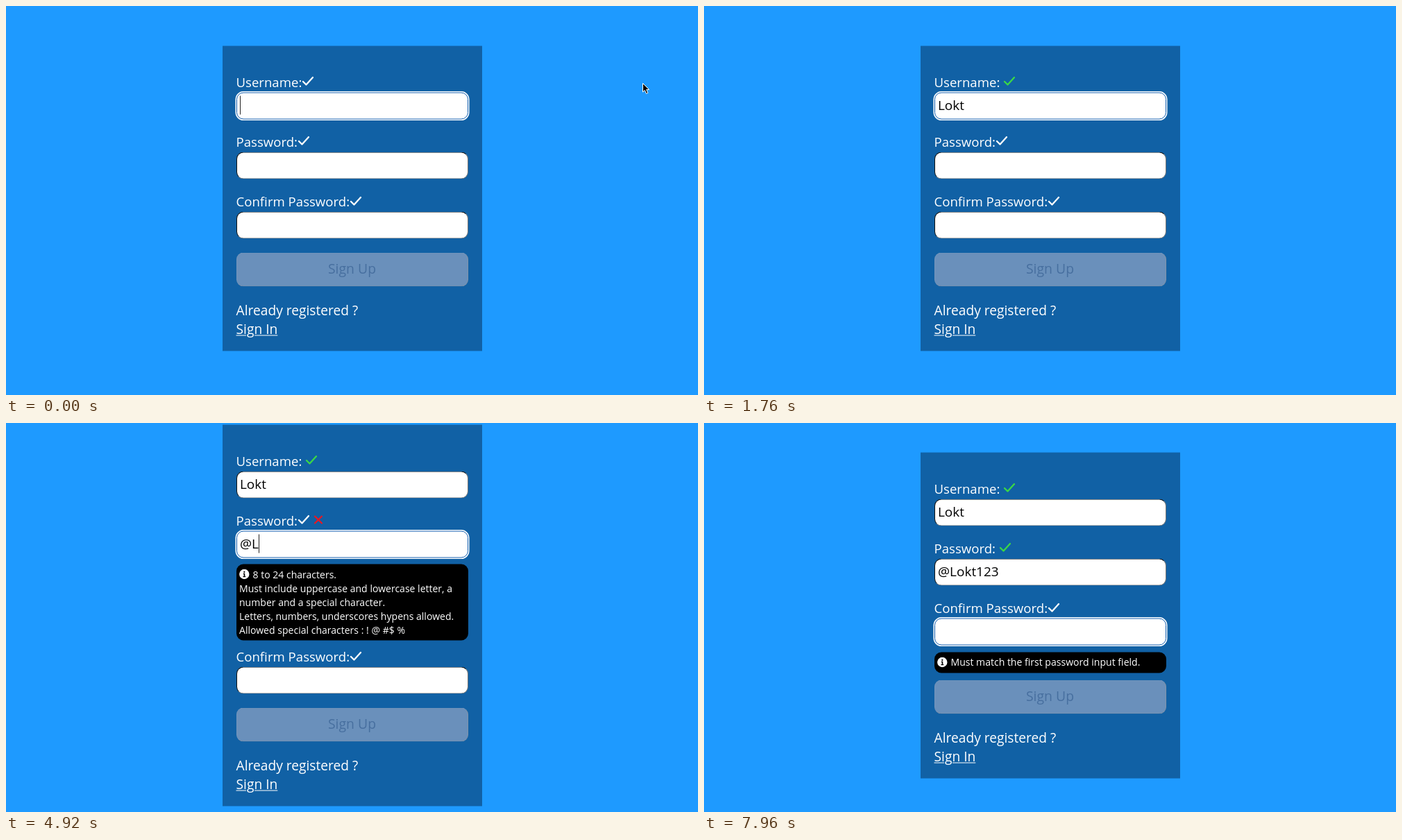
These frames come from a looping animation (997x561 px, 8000 ms). An HTML page:

```html
<!DOCTYPE html>
<html lang="en">
<head>
<meta charset="utf-8">
<title>Sign up form</title>
<style>
  * { box-sizing: border-box; }
  html, body { margin: 0; width: 100%; height: 100%; overflow: hidden; }
  body {
    position: relative;
    background: #1e9aff;
    color: #fff;
    font: 19.2px/27px "Open Sans", "Noto Sans", sans-serif;
    white-space: nowrap;
  }
  .card {
    position: absolute;
    left: 311.5px;
    top: 277.5px;
    width: 374px;
    padding: 38px 20px 19.5px;
    background: #1161a5;
    transform: translateY(-50%);
  }
  .field { padding-bottom: 8.9px; }
  .label { display: flex; height: 29px; font-size: 18.6px; }
  .label svg { height: 20px; margin-top: 3.5px; fill: none; }
  .check { width: 17.5px; stroke: #fff; stroke-width: 2.3; }
  .cross { width: 14px; margin-left: 5px; stroke: #f5141c; stroke-width: 2.1; visibility: hidden; }
  .bad .cross { visibility: visible; }
  .ok .check { margin-left: 5px; stroke: #3bd845; }
  .input {
    display: flex;
    align-items: center;
    height: 39px;
    margin-bottom: 9.5px;
    padding: 0 0 1px 4.5px;
    border: 1.8px solid;
    border-color: #111 #777 #777 #111;
    border-radius: 10px;
    background: #fff;
    color: #000;
    font-size: 19px;
  }
  .focus .input { border-color: #1560b0; box-shadow: 0 0 0 1.5px #fff; }
  .caret { width: 1.2px; height: 27px; background: #222; visibility: hidden; }
  .info {
    display: none;
    padding: 4.5px 4.5px 5.5px;
    border-radius: 10px;
    background: #000;
    font-size: 14.05px;
    line-height: 20px;
  }
  .help .info { display: block; }
  .info svg { width: 15px; height: 15px; margin-right: 4.5px; vertical-align: -2.5px; }
  .button {
    height: 49px;
    margin: 1.8px 0 19.5px;
    border: 1.8px solid;
    border-color: #7595bb #8093aa #8093aa #7595bb;
    border-radius: 10px;
    background: #6a90bb;
    color: #476f9f;
    font-size: 19.4px;
    line-height: 44px;
    text-align: center;
  }
  .link { text-decoration: underline; text-decoration-thickness: 1.3px; text-underline-offset: 2px; }
  .pointer { position: absolute; left: 916px; top: 110px; width: 13px; height: 19px; }
</style>
</head>
<body>
<div class="card">
  <div id="fields"></div>
  <div class="button">Sign Up</div>
  <div>Already registered ?</div>
  <div><span class="link">Sign In</span></div>
</div>
<svg class="pointer" viewBox="0 0 13 19">
  <path d="M1.5 1.5V14L4.4 11.4 6.5 16.4 8.8 15.4 6.7 10.6H10.6Z" stroke="#fff"/>
</svg>

<script>
const LOOP = 8000, BLINK = 480, POINTER_HIDES = 80;

// keys: time of each keystroke; ok: time the entry becomes valid
const fields = [
  {
    label: 'Username:', text: 'Lokt', keys: [80, 480, 920, 1275],
    focus: 0, blur: 1920, ok: 1315, waits: true,
    help: ['4 to 24 characters.', 'Must begin with a letter.',
      'Letters, numbers, underscores hypens allowed.']
  },
  {
    label: 'Password:', text: '@Lokt123',
    keys: [3880, 4460, 4960, 5120, 5320, 5720, 6000, 6265],
    focus: 1920, blur: 7160, ok: 6318,
    help: ['8 to 24 characters.', 'Must include uppercase and lowercase letter, a',
      'number and a special character.',
      'Letters, numbers, underscores hypens allowed.',
      'Allowed special characters : ! @ #$ %']
  },
  {
    label: 'Confirm Password:', text: '', keys: [],
    focus: 7160, blur: LOOP, ok: Infinity,
    help: ['Must match the first password input field.']
  }
];

const infoIcon = `<svg viewBox="0 0 15 15"><circle cx="7.3" cy="7.5" r="7.2" fill="#fff"/>
  <circle cx="7.3" cy="4.3" r="1.15"/>
  <path d="M5.8 6.9H7.5V11M5.5 11H9.2" fill="none" stroke="#000" stroke-width="1.5"/></svg>`;

const template = f => `
  <div class="label">${f.label}
    <svg class="check" viewBox="0 0 17.5 20"><path d="M2 10.5L6.5 15 16 4.5"
      stroke-linecap="round" stroke-linejoin="round"/></svg>
    <svg class="cross" viewBox="0 0 14 20"><path d="M2 5L12 15M12 5L2 15" stroke-linecap="round"/></svg>
  </div>
  <div class="input"><span class="text"></span><i class="caret"></i></div>
  <div class="info">${infoIcon}${f.help.join('<br>')}</div>`;

const pointer = document.querySelector('.pointer');
const show = (el, on) => { el.style.visibility = on ? 'visible' : 'hidden'; };

for (const f of fields) {
  f.el = document.createElement('div');
  f.el.className = 'field';
  f.el.innerHTML = template(f);
  f.value = f.el.querySelector('.text');
  f.caret = f.el.querySelector('.caret');
  document.getElementById('fields').append(f.el);
}

function drawField(f, t) {
  const count = f.keys.filter(k => k <= t).length;
  const active = t >= f.focus && t < f.blur;
  const valid = t >= f.ok;
  const since = t - (count ? f.keys[count - 1] : f.focus);
  const classes = f.el.classList;
  classes.toggle('focus', active);
  classes.toggle('ok', valid);
  classes.toggle('bad', count > 0 && !valid);
  classes.toggle('help', active && !valid && (count > 0 || !f.waits));
  f.value.textContent = f.text.slice(0, count);
  show(f.caret, active && Math.floor(since / BLINK) % 2 === 0);
}

function draw() {
  const t = performance.now() % LOOP;
  fields.forEach(f => drawField(f, t));
  show(pointer, t < POINTER_HIDES);
  requestAnimationFrame(draw);
}
draw();
</script>
</body>
</html>
```
